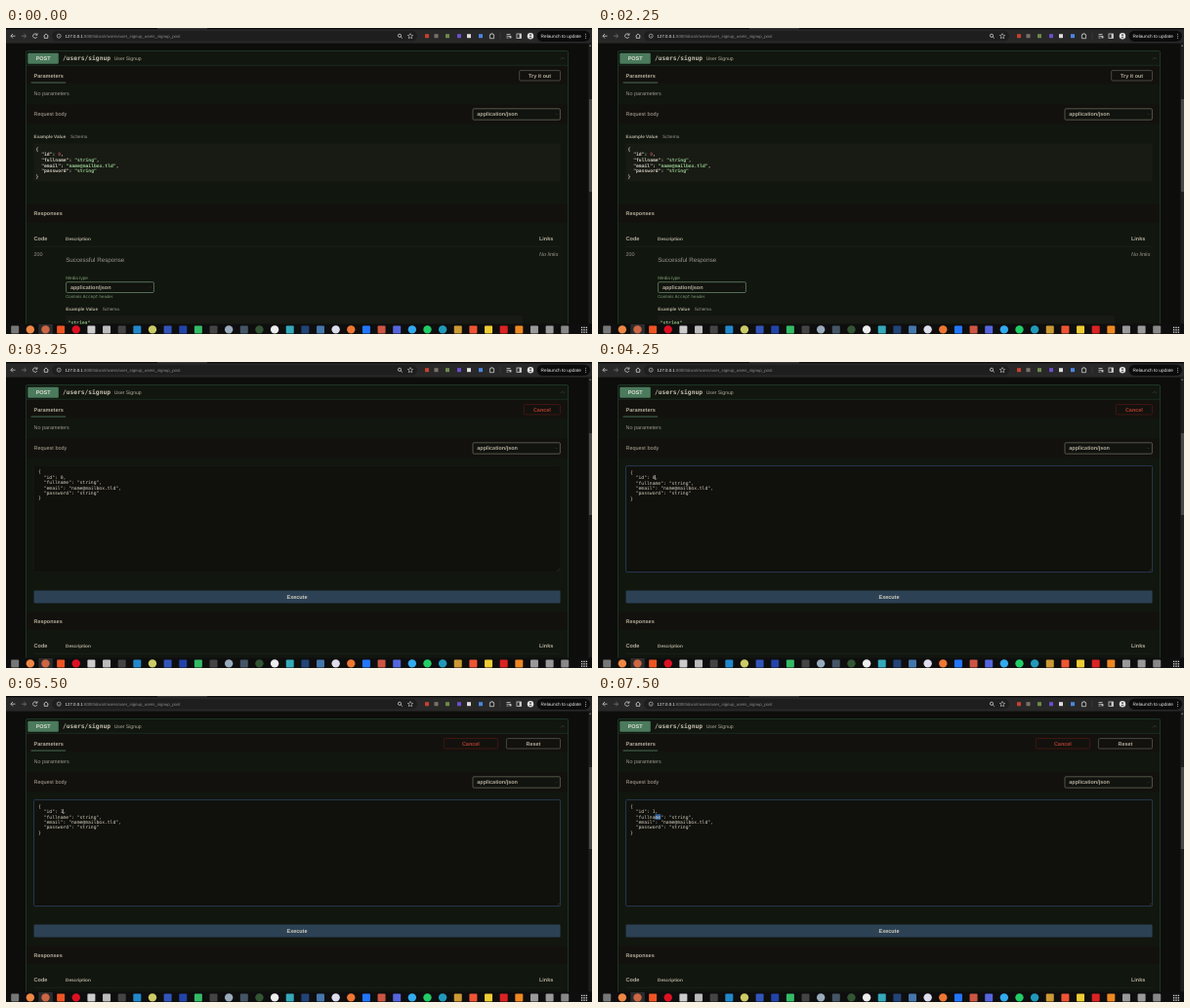
An HTML page that plays this animation: 600x314 px, repeating every 8 s.

```html
<!DOCTYPE html>
<html lang="en">
<head>
<meta charset="utf-8">
<title>API docs</title>
<style>
html, body { margin: 0; width: 100%; height: 100%; overflow: hidden; background: #0d0d0b; }
svg { display: block; width: 600px; height: 314px; text-rendering: geometricPrecision; }
text { font-family: "Liberation Sans", Arial, sans-serif; white-space: pre; }
.b { font-weight: bold; }
.i { font-style: italic; }
.m { font-family: "DejaVu Sans Mono", monospace; }
.c { text-anchor: middle; }
</style>
</head>
<body>
<svg id="stage" viewBox="0 0 600 314">
  <g id="panel"></g>
  <g id="view"></g>
  <g id="edit"></g>
  <g id="live"></g>
  <g id="chrome"></g>
</svg>
<script>
const LOOP = 8000, OPEN = 2500, FOCUS = 4250, CHANGE = 5130, TYPED = 5380, PICK = 6380;
const INK = '#b3ac9a', SOFT = '#99968a', BAND = '#13110e', LINE = '#24402f';
const EDGE = '#56574c', MOSS = '#7d9a72', LEAF = '#97cc90';
const MONO = 4.71, CELL = MONO * 0.602;
const $ = id => document.getElementById(id);

const rect = (x, y, w, h, fill, stroke = 'none', r = 0, sw = .8) =>
  `<rect x="${x}" y="${y}" width="${w}" height="${h}" rx="${r}" fill="${fill}" stroke="${stroke}" stroke-width="${sw}"/>`;
const text = (x, y, s, size = 5.47, fill = INK, cls = '') =>
  `<text x="${x}" y="${y}" font-size="${size}" fill="${fill}" class="${cls}">${s}</text>`;
const dot = (x, y, r, fill, stroke = 'none') =>
  `<circle cx="${x}" cy="${y}" r="${r}" fill="${fill}" stroke="${stroke}" stroke-width=".8"/>`;
const path = (d, stroke, w = .8, fill = 'none') =>
  `<path d="${d}" stroke="${stroke}" stroke-width="${w}" fill="${fill}"/>`;
const tint = (s, fill) => `<tspan fill="${fill}">${s}</tspan>`;
const band = (y, h) => rect(21, y, 554, h, BAND);
const select = (x, y, w, h, stroke) =>
  rect(x, y, w, h, '#11130f', stroke, 1.2) +
  text(x + 4.3, y + h / 2 + 1.9, 'application/json', 5.47, INK, 'b') +
  path(`M${x + w - 5} ${y + h / 2 - .6}l1.2 1.2l1.2-1.2`, '#333830', .6);
const button = (x, w, label, stroke, fill) =>
  rect(x, 43.6, w, 10.4, 'none', stroke, 1.2) + text(x + w / 2, 50.7, label, 5.47, fill, 'b c');
const mix = (a, b, k) => `rgb(${a.map((v, i) => Math.round(v + (b[i] - v) * k))})`;
const ramp = (t, from, to) => Math.min(1, Math.max(0, (t - from) / (to - from)));

const fields = id => [['id', id], ['fullname', '"string"'], ['email', '"name@mailbox.tld"'], ['password', '"string"']];
function json(x, y, step, id, paint, cls, fill) {
  const rows = fields(id).map(([key, value], i) =>
    `  "${key}": ${paint(value)}${i < 3 ? ',' : ''}`);
  return ['{', ...rows, '}'].map((s, i) => text(x, y + i * step, s, MONO, fill, cls)).join('');
}
const tableHead = y =>
  text(28.5, y, 'Code', 5.6, INK, 'b') + text(61, y - .3, 'Description', 4.7, INK, 'b') +
  text(546, y, 'Links', 5.47, INK, 'b') + path(`M28.5 ${y + 6.4}H568`, '#20261e', .6);
const tabs = (x, y) =>
  text(x, y, 'Example Value', 4.69, INK, 'b') + text(x + 37.5, y, 'Schema', 4.69, SOFT);

$('panel').innerHTML =
  rect(20.6, 23.6, 555, 300, '#11160f', LINE, 1.2) +
  path('M21 38.4H575', LINE, .6) + band(38.8, 18.8) + band(78.5, 20) +
  rect(22.3, 25.7, 31.5, 11, '#4b7a5c', 'none', 1) + text(38.1, 33.1, 'POST', 5.47, '#dfe3d8', 'b c') +
  text(58, 33.3, '/users/signup', 6.25, '#c6c0b0', 'b m') + text(110.7, 33, 'User Signup', 5.08, INK) +
  path('M568 32.2l2-2l2 2', '#3c443a', .7) +
  text(28.5, 50.7, 'Parameters', 5.55, INK, 'b') + rect(25.6, 55.6, 35.6, .9, '#4d7a5a') +
  text(28.5, 69.2, 'No parameters', 5.47, SOFT) + text(28.5, 90.3, 'Request body', 5.47, INK) +
  select(478, 82.8, 89.4, 11.4, '#66665a');

const paintValue = v => tint(v, v[0] === '"' ? LEAF : '#a8524a');
$('view').innerHTML =
  tabs(28.5, 113.4) + rect(28.5, 118.6, 539.3, 38.8, '#181a14', 'none', 1) +
  json(30.5, 125.8, 5.6, '0', paintValue, 'b m', '#cdc8ba') +
  band(181, 18.6) + text(28.5, 192.4, 'Responses', 5.47, INK, 'b') + tableHead(217.8) +
  text(28.5, 233.6, '200', 5.47, SOFT) + text(546, 233.6, 'No links', 5.47, SOFT, 'i') +
  text(61.2, 240.3, 'Successful Response', 6.25, SOFT) +
  text(61.2, 258.4, 'Media type', 4.65, MOSS) + select(61.6, 260.7, 89.8, 10.8, '#668565') +
  text(61.2, 277.3, 'Controls <tspan class="m">Accept</tspan> header.', 4.37, MOSS) +
  tabs(61.2, 289.8) + rect(61.2, 295, 468, 12, '#181a14') +
  text(63.6, 303.8, '"string"', MONO, LEAF, 'b m');

$('edit').innerHTML =
  rect(28.6, 234.6, 539, 13, '#2c4154', 'none', 1) + text(298, 243.1, 'Execute', 5.47, '#d3cdbf', 'b c') +
  band(256.4, 18.4) + text(28.5, 267.6, 'Responses', 5.47, INK, 'b') + tableHead(292.9);

// Browser bar, scroll track and dock
const icons = ('777 e84 c64 e52 d12 ccc bbb 444 28c cc6 35b 24a 3b6 444 9ab 456 353 eee 3ab ' +
  '247 47a dde e73 27f c54 56d 3ae 2c6 29b c93 e53 ec3 d22 e82 999 999 888').split(' ');
const round = new Set([1, 2, 4, 9, 14, 16, 17, 21, 22, 26, 27, 28]);
const addons = [['431', '#c8402f'], ['440.5', '#77736a'], ['452', '#6f8a4a'], ['464', '#6a4fd0'], ['474', '#ddd'], ['486', '#4a86e0']];
const W = '#ccc';
$('chrome').innerHTML =
  rect(0, 0, 600, 15.6, '#282828') + rect(0, 0, 600, 1.3, '#0a0a0a') + rect(155, 0, 51, 1.3, '#303030') +
  rect(47, 3, 374, 10.4, '#1e1e1e', 'none', 5.2) +
  path('M9.5 8.2H5M7 6L4.8 8.2L7 10.4', W) + path('M16 8.2h4.5M18.4 6l2.2 2.2l-2.2 2.2', '#777') +
  path('M31.6 6.9A2.2 2.2 0 1 0 31.8 9M32 5.4v1.8h-1.8', W) + path('M38.6 8.2l2.4-2.2l2.4 2.2M39.3 7.8v2.6h3.4V7.8', W) +
  dot(54.2, 8.2, 2, 'none', '#aaa') + path('M54.2 7.8v1.5', '#aaa', .6) +
  text(60.6, 9.8, tint('127.0.0.1', '#f0f0f0') + ':8000/docs#/users/user_signup_users_signup_post', 4.37, '#8c8c8c') +
  dot(403, 7.8, 1.6, 'none', W) + path('M404.2 9l1.6 1.6', W) +
  path('M414 5.6l.8 1.7l1.9.2l-1.4 1.3l.4 1.9l-1.7-1l-1.7 1l.4-1.9l-1.4-1.3l1.9-.2z', W, .6) +
  addons.map(([x, c]) => rect(x - 2, 6.2, 4, 4, c)).join('') +
  path('M495.4 6.7h1.4a.8.8 0 1 1 1.4 0h1.4v4h-4.2z', W) + path('M506 5v6.5', '#444', .6) +
  path('M512.5 6.5h4M512.5 8.3h4M512.5 10.1h2', W) + rect(515.6, 8.2, 1.8, 2.2, W) +
  rect(523, 6, 4.6, 4.4, 'none', W) + rect(525.6, 6, 2, 4.4, W) +
  dot(537, 8.2, 3.2, '#e4e4e4') + dot(537, 7.3, 1, '#555') + path('M535.2 10.2q1.8-2.4 3.6 0z', 'none', 0, '#555') +
  rect(543.6, 2.7, 54.4, 11.2, '#0b0b0b', 'none', 5.6) + text(547.6, 9.9, 'Relaunch to update', 4.75, '#e6e6e6') +
  [6.2, 8.2, 10.2].map(y => dot(593.6, y, .5, W)).join('') +
  rect(596.4, 15.6, 3.6, 288, '#1e1e1e') + path('M597 18.8l1.2-1.6l1.2 1.6z', 'none', 0, '#888') +
  `<rect id="thumb" x="596.9" y="73" width="3.1" fill="#484848"/>` +
  rect(0, 303.6, 600, 10.4, '#0e0e0e') + rect(33.4, 304, 14.4, 10, '#2c2c2c') +
  icons.map((c, i) => {
    const x = 9.2 + i * 15.64;
    return round.has(i) ? dot(x, 309.4, 4.2, '#' + c) : rect(x - 4, 305.4, 8, 8, '#' + c, 'none', 1);
  }).join('') +
  [0, 1, 2, 3, 4, 5, 6, 7, 8].map(i => rect(588.9 + i % 3 * 2.4, 306.7 + (i / 3 | 0) * 2.4, 1.4, 1.4, W)).join('');

function buttons(t) {
  if (t < OPEN) return button(525.7, 41.8, 'Try it out', EDGE, INK);
  const k = ramp(t, OPEN, 2750);
  const edge = mix([86, 87, 76], [74, 26, 19], k), ink = mix([179, 172, 154], [178, 62, 46], k);
  if (t < CHANGE) return button(530.3, 37.2, 'Cancel', edge, ink);
  const w = 36 + 19 * ramp(t, CHANGE, 5500);
  return button(448.4, w, 'Cancel', edge, ink) +
    button(457.4 + w, 110.1 - w, 'Reset', EDGE, INK);
}

// Row and column of the caret while it is lit
function caretAt(t) {
  if (t >= FOCUS && t < 4750) return [1, 9];
  if (t >= CHANGE && t < TYPED) return [1, 8];
  if (t >= TYPED && t < 5880) return [1, 9];
  if (t >= PICK && t < 7000) return [2, 9];
}

function editor(t) {
  const focused = t >= FOCUS, x = 33, y = focused ? 114.6 : 114.2, step = 5.45;
  const id = t < CHANGE ? '0' : t < TYPED ? '' : '1';
  const caret = caretAt(t), picked = t < 7250 ? 0 : t < 7500 ? 1 : 2;
  let out = rect(28.6, 106.6, 539, 109, '#10100c', focused ? '#2d4560' : '#171a14', 1);
  if (picked) out += rect(x + 9 * CELL, 121.3, picked * CELL, 5.6, '#2f62a0');
  out += json(x, y, step, id, v => v, 'm', '#d6d0c0');
  if (caret) out += rect(x + caret[1] * CELL - .2, y + caret[0] * step - 4.1, .5, 5, '#ddd');
  return out + path('M564.6 214.4l2-2M565.8 214.4l.8-.8', '#555', .4);
}

function draw(now) {
  const t = now % LOOP, open = t >= OPEN;
  $('view').style.display = open ? 'none' : '';
  $('edit').style.display = open ? '' : 'none';
  $('thumb').setAttribute('height', open ? 84 : 95);
  $('live').innerHTML = buttons(t) + (open ? editor(t) : '');
}

const start = performance.now();
function tick() {
  draw(performance.now() - start);
  requestAnimationFrame(tick);
}
tick();
</script>
</body>
</html>
```
